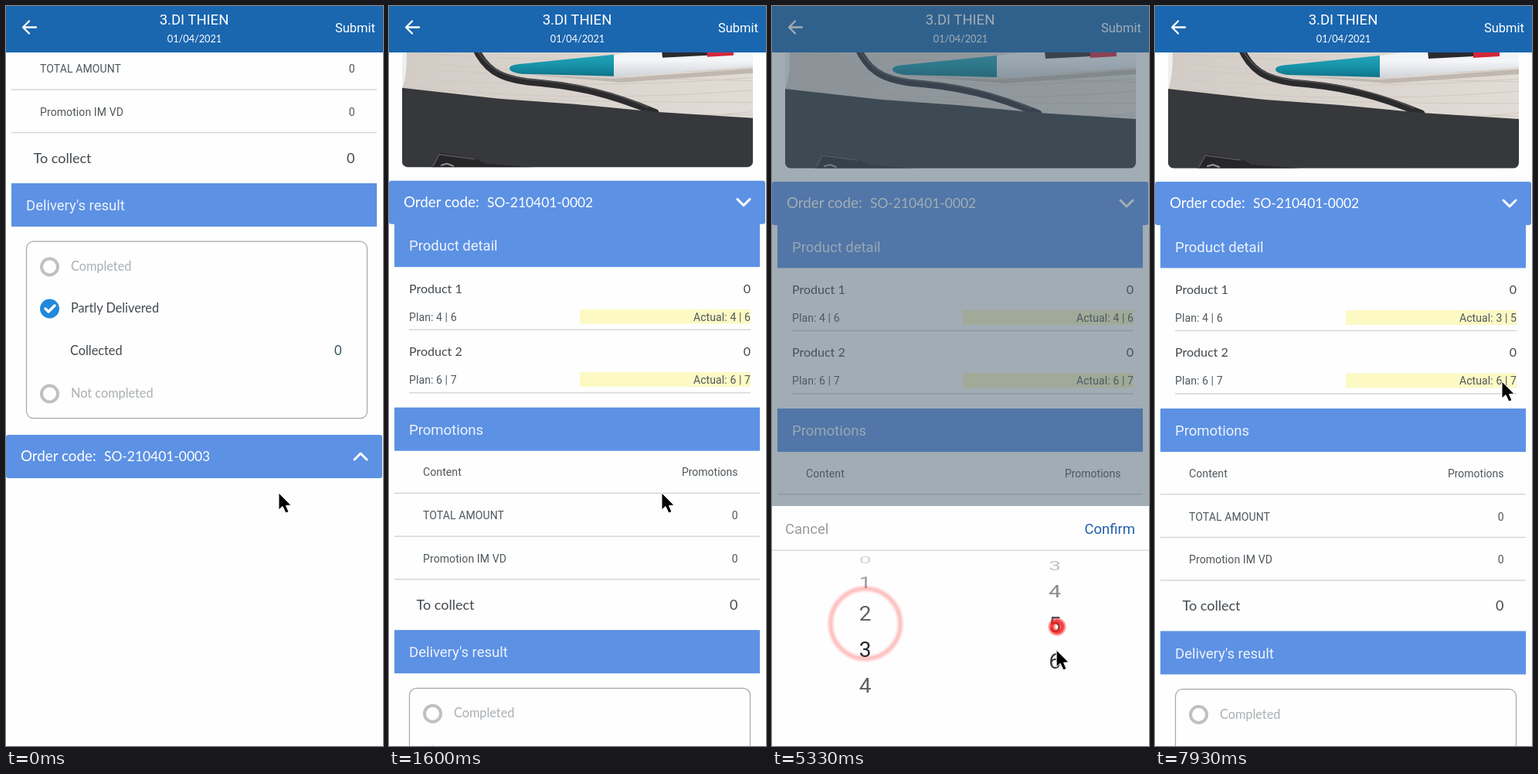
An HTML page that plays this animation: 488 px wide and 956 px high, repeating every 8 s.

```html
<!DOCTYPE html>
<html lang="en">
<head>
<meta charset="utf-8">
<title>Delivery confirmation</title>
<style>
  html, body { margin: 0; width: 100%; height: 100%; overflow: hidden; background: #fdfefd; }
  svg { display: block; width: 100%; height: 100%; }
  text { font-family: Roboto, sans-serif; }
  .round { font-family: Lato, sans-serif; }
  .line { fill: none; stroke-linecap: round; stroke-linejoin: round; }
</style>
</head>
<body>
<svg id="stage" viewBox="0 0 488 956"></svg>
<script>
const LOOP = 8000, FRAME = 1000 / 15;
const BLUE = '#5c91e4', INK = '#50575e', DARK = '#43494f', PALE = '#acb0b4';

// Markup helpers
const text = (x, y, size, fill, string, extra = '') =>
  `<text x="${x}" y="${y}" font-size="${size}" fill="${fill}" ${extra}>${string}</text>`;
const END = 'text-anchor="end"', MID = 'text-anchor="middle"', ROUND = 'class="round"';
const rect = (x, y, w, h, fill, extra = '') =>
  `<rect x="${x}" y="${y}" width="${w}" height="${h}" fill="${fill}" ${extra}/>`;
const line = (d, stroke, width) =>
  `<path class="line" d="${d}" stroke="${stroke}" stroke-width="${width}"/>`;
const shape = (d, fill) => `<path d="${d}" fill="${fill}"/>`;
const divider = (x1, x2, y) => rect(x1, y - .75, x2 - x1, 1.5, '#d5d7d8');

const section = (y, title) =>
  rect(7, y, 473, 56, BLUE) + text(26, y + 35, 18.5, '#eef3fc', title);

function orderBar(y, code, open) {
  const tip = open ? 8 : -8, start = y + (open ? 24 : 32);
  return rect(0, y, 487, 56, BLUE, 'rx="3"') +
    text(19, y + 34, 18.8, '#fff', 'Order code:', ROUND) +
    text(127, y + 34, 17.4, '#fff', code, ROUND) +
    line(`M451 ${start}l8 ${tip}l8 ${-tip}`, '#fff', 3);
}

const product = (y, name, plan, id) =>
  text(26, y, 16, DARK, name, ROUND) +
  text(468, y, 16, DARK, '0', `${ROUND} ${END}`) +
  rect(247, y + 21, 221, 19, '#fdf9c5') +
  text(26, y + 36, 14, INK, 'Plan: ' + plan, 'letter-spacing=".1"') +
  text(468, y + 36, 14, INK, 'Actual: ' + plan, `id="${id}" letter-spacing=".1" ${END}`) +
  divider(26, 468, y + 47.5);

const amountRow = (y, label, value) =>
  text(44, y, 14, INK, label, 'letter-spacing=".1"') +
  text(451.5, y, 14, INK, value, END) + divider(7, 480, y + 22);

const option = (y, label, checked) => (checked
  ? `<circle cx="56.5" cy="${y}" r="12.5" fill="#2188da"/>` + line(`M51 ${y}l4 4l8 -8`, '#fff', 3.5)
  : `<circle cx="56.5" cy="${y}" r="10.5" fill="none" stroke="#bfc0c1" stroke-width="4"/>`) +
  text(84, y + 5, 16.3, checked ? DARK : PALE, label, ROUND);

function photo() {
  let grain = '';
  for (let i = 0; i < 9; i++)
    grain += line(`M17 ${50 + i * 11}q220 ${10 + i % 3 * 7} 454 ${i % 4 * 5}`, '#d0c8c1', 1);
  return `<clipPath id="frame"><rect x="17" y="-40" width="454" height="249.5" rx="7"/></clipPath>
    <linearGradient id="wood"><stop stop-color="#d3ccc6"/><stop offset="1" stop-color="#e2dcd6"/></linearGradient>
    <linearGradient id="grip" x2="0" y2="1"><stop stop-color="#22a3b7"/><stop offset=".5" stop-color="#1793a9"/>
      <stop offset="1" stop-color="#0f7389"/></linearGradient>
    <linearGradient id="barrel" x2="0" y2="1"><stop offset=".5" stop-color="#f3f5f7"/>
      <stop offset="1" stop-color="#cfd3d9"/></linearGradient>
    <g clip-path="url(#frame)">` +
    rect(17, -40, 454, 250, 'url(#wood)') + grain +
    shape('M17 50h5q3 35-5 58z', '#eef0ef') +
    line('M111 54C124 83 142 94 178 99C244 104 290 116 345 139', '#2b2b2e', 9) +
    line('M114 58C129 83 148 92 180 96C240 100 290 112 335 132', '#515154', 1.5) +
    shape('M180 90L291 95L471 82V88L300 100z', '#c0b7b0') +
    shape('M291 64L400 50H471V79L291 93z', 'url(#barrel)') +
    shape('M156 82Q156 77 172 76L291 64V92L172 89Q156 87 156 82z', 'url(#grip)') +
    shape('M353 58H413V65L354 68z', '#2c2a30') +
    shape('M412 56H446V65L412 67z', '#d3273a') +
    shape('M17 107L142 121L240 128L345 138L471 146V210H17z', '#37383b') +
    shape('M55 210L66 191L112 198L125 205L190 210z', '#262629') +
    line('M57 208l8 -15l46 6', '#59585a', 1.5) +
    line('M68 207l7 -2l8 3', '#9a9a9b', 2) + '</g>';
}

const content = photo() +
  orderBar(227, 'SO-210401-0002', true) +
  section(282.5, 'Product detail') +
  product(372, 'Product 1', '4 | 6', 'actual') +
  product(453.4, 'Product 2', '6 | 7', 'actual2') +
  section(520, 'Promotions') +
  amountRow(608.7, 'Content', 'Promotions') +
  amountRow(664.5, 'TOTAL AMOUNT', '0') +
  amountRow(720, 'Promotion IM VD', '0') +
  text(35.5, 781, 18, DARK, 'To collect', ROUND) +
  text(451.5, 781, 18, DARK, '0', `${ROUND} ${END}`) +
  section(807.5, "Delivery's result") +
  rect(26.5, 882.7, 441, 228.5, 'none', 'rx="9" stroke="#a5a8aa" stroke-width="1.2"') +
  option(915.5, 'Completed') +
  option(969.5, 'Partly Delivered', true) +
  text(83, 1029.5, 16.3, DARK, 'Collected', ROUND) +
  text(434.5, 1029, 16.5, '#35535f', '0', `${ROUND} ${END}`) +
  option(1079.5, 'Not completed') +
  orderBar(1132.5, 'SO-210401-0003', false);

const header = rect(0, 0, 488, 60, '#1a66af') +
  line('M39 27.5H22.5M30 19.5l-8 8l8 8', '#fff', 2.3) +
  text(243.5, 24, 18.5, '#fff', '3.DI THIEN', MID) +
  text(244, 46.5, 12.7, '#fff', '01/04/2021', `${ROUND} ${MID}`) +
  text(478, 34.3, 16.5, '#fff', 'Submit', END);

const sheet = rect(0, 646, 488, 320, '#fefefe') +
  text(17, 682, 18.5, '#9b9b9b', 'Cancel') +
  text(470, 682, 18.5, '#1f5fa8', 'Confirm', END) +
  rect(0, 702.5, 488, 1.3, '#d6d6d6') + '<g id="wheels"></g>';

const el = id => document.getElementById(id);
el('stage').innerHTML = `<g id="content">${content}</g>${header}
  ${rect(0, 0, 488, 956, 'rgb(70,92,108)', 'id="dim"')}
  <g id="sheet">${sheet}</g><g id="rings"></g>
  <path id="cursor" d="M0 0V22L5 17.5L9 26L13 24.5L9.5 16.5L16 16z" stroke="#fff" stroke-width="1"/>`;

// Motion: each key is [time, ...values]; values ease between neighbouring keys
const scroll = { start: 640, duration: 972, distance: 578.5 };
const cursorKeys = [
  [0, 353, 629], [2500, 353, 629], [3060, 443, 401], [4000, 443, 401],
  [4500, 121, 798], [4560, 121, 798], [4800, 121, 846], [4840, 121, 846],
  [5180, 369, 802], [5230, 369, 802], [5455, 367, 870], [5750, 367, 870],
  [6400, 446, 675], [7100, 446, 675], [7700, 449, 485]];
const dimKeys = [[3110, 0], [3220, .5], [6800, .5], [7000, 0]];
const sheetKeys = [[3150, 312], [3480, 0], [6800, 0], [7060, 312]];
const leftKeys = [[4610, 4], [4880, 3]];
const rightKeys = [[5260, 6], [5455, 5]];
const presses = [[3120, 445, 402], [4580, 121, 798], [5240, 369, 802], [6700, 447, 677]];
const RING_LIFE = 900, CONFIRMED = 6800;

function track(keys, t) {
  const next = keys.findIndex(key => key[0] > t);
  if (next < 0) return keys[keys.length - 1].slice(1);
  if (next === 0) return keys[0].slice(1);
  const a = keys[next - 1], b = keys[next];
  const x = (t - a[0]) / (b[0] - a[0]), eased = x * x * (3 - 2 * x);
  return a.slice(1).map((v, i) => v + (b[i + 1] - v) * eased);
}

// Picker digits lie on a cylinder seen from the front
function wheel(x, max, value) {
  let digits = '';
  for (let n = 0; n <= max; n++) {
    const k = n - value, angle = k * .365;
    if (Math.abs(k) > 3.6) continue;
    const place = `translate(${x} ${831 + 130 * Math.sin(angle)}) scale(1 ${Math.cos(angle)})`;
    digits += text(0, 10, 28, '#24272b', n,
      `${MID} transform="${place}" opacity="${1 - .27 * Math.abs(k)}"`);
  }
  return digits;
}

// A press spreads into a soft ring that fades
function ring([start, x, y], t) {
  const p = (t - start) / RING_LIFE;
  if (p < 0 || p >= 1) return '';
  const radius = 49 * (1 - (1 - p) ** 1.4), fade = (1 - p * p) ** 1.3;
  const circle = (width, alpha) => `<circle cx="${x}" cy="${y}" r="${radius}"
    fill="none" stroke="#f81818" stroke-width="${width}" opacity="${alpha * fade}"/>`;
  return circle(10, .25) + circle(7, .45) + circle(4, .6);
}

function draw(t) {
  const { start, duration, distance } = scroll;
  const x = Math.min(1, Math.max(0, (t - start) / duration));
  el('content').setAttribute('transform', `translate(0 ${-distance * (1 - x) ** 1.38})`);
  el('dim').setAttribute('opacity', track(dimKeys, t)[0]);
  el('sheet').setAttribute('transform', `translate(0 ${track(sheetKeys, t)[0]})`);
  el('cursor').setAttribute('transform', `translate(${track(cursorKeys, t)})`);
  el('wheels').innerHTML = wheel(120.5, 4, track(leftKeys, t)[0]) + wheel(366, 6, track(rightKeys, t)[0]);
  el('rings').innerHTML = presses.map(press => ring(press, t)).join('');
  el('actual').textContent = 'Actual: ' + (t < CONFIRMED ? '4 | 6' : '3 | 5');
}

const origin = performance.now();
function tick() {
  const t = (performance.now() - origin) % LOOP;
  draw(Math.floor((t + 5) / FRAME) * FRAME);
  requestAnimationFrame(tick);
}
tick();
</script>
</body>
</html>
```
